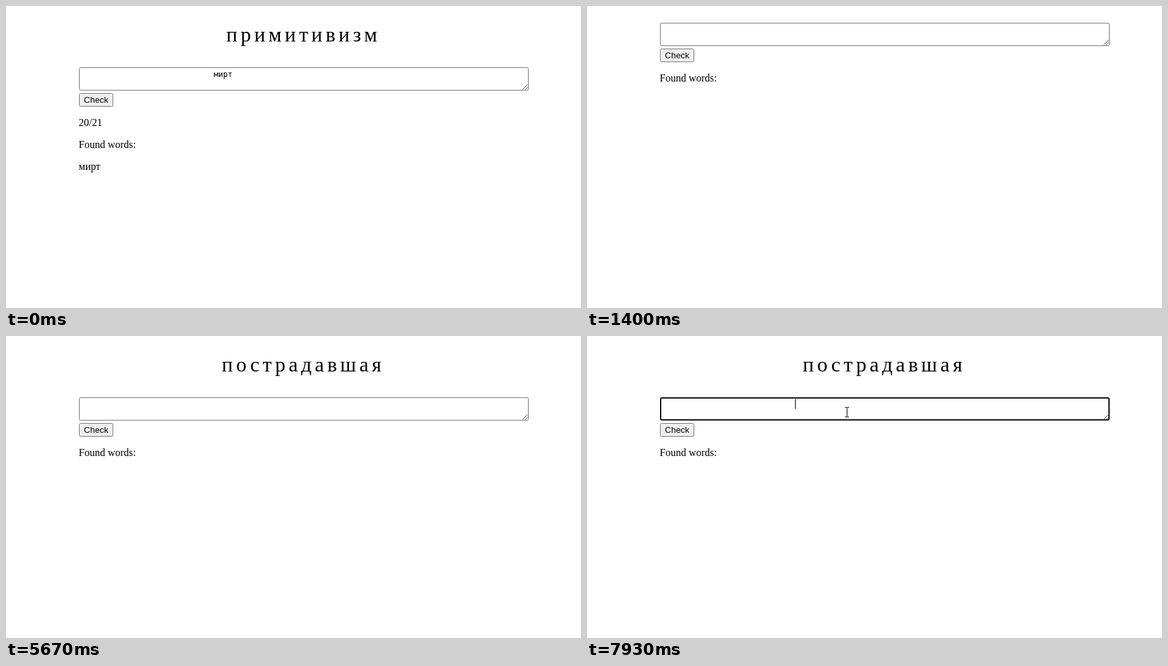
Animation of 890 by 468 pixels, one loop 8000 ms. Source, as an HTML page:

```html
<!DOCTYPE html>
<html lang="en">
<head>
<meta charset="utf-8">
<title>Word game</title>
<style>
  html, body { margin: 0; height: 100%; overflow: hidden; background: #fff; }
  svg { display: block; }
  text { font: 16px "Liberation Serif", serif; white-space: pre; }
  #title { font-size: 32px; letter-spacing: 5px; }
  #typed { font: 12px "DejaVu Sans Mono", monospace; }
  #label { font: 13.333px "Liberation Sans", sans-serif; }
  [hidden] { display: none; }
</style>
</head>
<body>
<svg width="890" height="468" viewBox="0 0 890 468">
  <text id="title" y="55"></text>
  <g id="form">
    <rect id="field" fill="#fff"/>
    <path d="M799.5 129.5l8-8M803.5 129.5l4-4" stroke="#555" fill="none"/>
    <text id="typed" x="321.5" y="110">мирт</text>
    <path id="caret" d="M322.5 98v15" stroke="#000"/>
    <rect x="113.5" y="135.5" width="52" height="20" rx="2" fill="#efefef" stroke="#767676"/>
    <text id="label" x="120.6" y="150">Check</text>
    <text id="score" x="112.5" y="186">20/21</text>
    <g id="found">
      <text x="112.5" y="186">Found words:</text>
      <text id="word" x="112.5" y="220">мирт</text>
    </g>
  </g>
  <g id="pointer">
    <path id="arrow" d="M.5.5v16l3.7-3.5 2.5 5.8 2.4-1-2.5-5.7h5.1z" fill="#fff" stroke="#000"/>
    <path id="beam" d="M-3-7.5h2.5l.5.5.5-.5h2.5M0-7v14M-3 7.5h2.5l.5-.5.5.5h2.5" fill="none" stroke="#000"/>
  </g>
</svg>
<script>
const LOOP = 8000, FPS = 15, ENTER_STEP = 92;
const path = [[65, 1], [180, 62], [280, 105], [349, 121], [374, 122],
              [388, 121], [395, 120], [399, 119], [401, 118], [402, 118]];
const $ = id => document.getElementById(id);
const show = (id, on) => $(id).toggleAttribute('hidden', !on);
const attrs = (id, values) => {
  for (const name in values) $(id).setAttribute(name, values[name]);
};

function draw(t) {
  const solved = t < 1200, next = t >= 5670, focused = t >= 6870;

  $('title').textContent = solved ? 'примитивизм' : next ? 'пострадавшая' : '';
  attrs('title', { x: solved ? 341 : 334 });
  attrs('form', { transform: `translate(0 ${solved || next ? 0 : -69})` });
  attrs('found', { transform: `translate(0 ${solved ? 34 : 0})` });
  for (const id of ['typed', 'score', 'word']) show(id, solved);

  const step = Math.floor((t + 5) * FPS / 1000) - ENTER_STEP;
  const [x, y] = path[Math.max(0, Math.min(step, path.length - 1))];
  const hover = step >= 0 && x > 113 && y > 95;
  show('pointer', step >= 0);
  show('arrow', !hover);
  show('beam', hover);
  attrs('pointer', { transform: `translate(${hover ? x + .5 : x} ${y})` });

  const line = focused ? 2 : 1;
  attrs('field', {
    x: 113 + line / 2, y: 95 + line / 2, width: 696 - line, height: 36 - line, rx: 2,
    'stroke-width': line, stroke: focused ? '#101010' : hover ? '#4f4f4f' : '#767676'
  });
  show('caret', focused && (t < 7400 || t >= 7870));
}

const start = performance.now();
function tick() {
  draw((performance.now() - start) % LOOP);
  requestAnimationFrame(tick);
}
tick();
</script>
</body>
</html>
```
